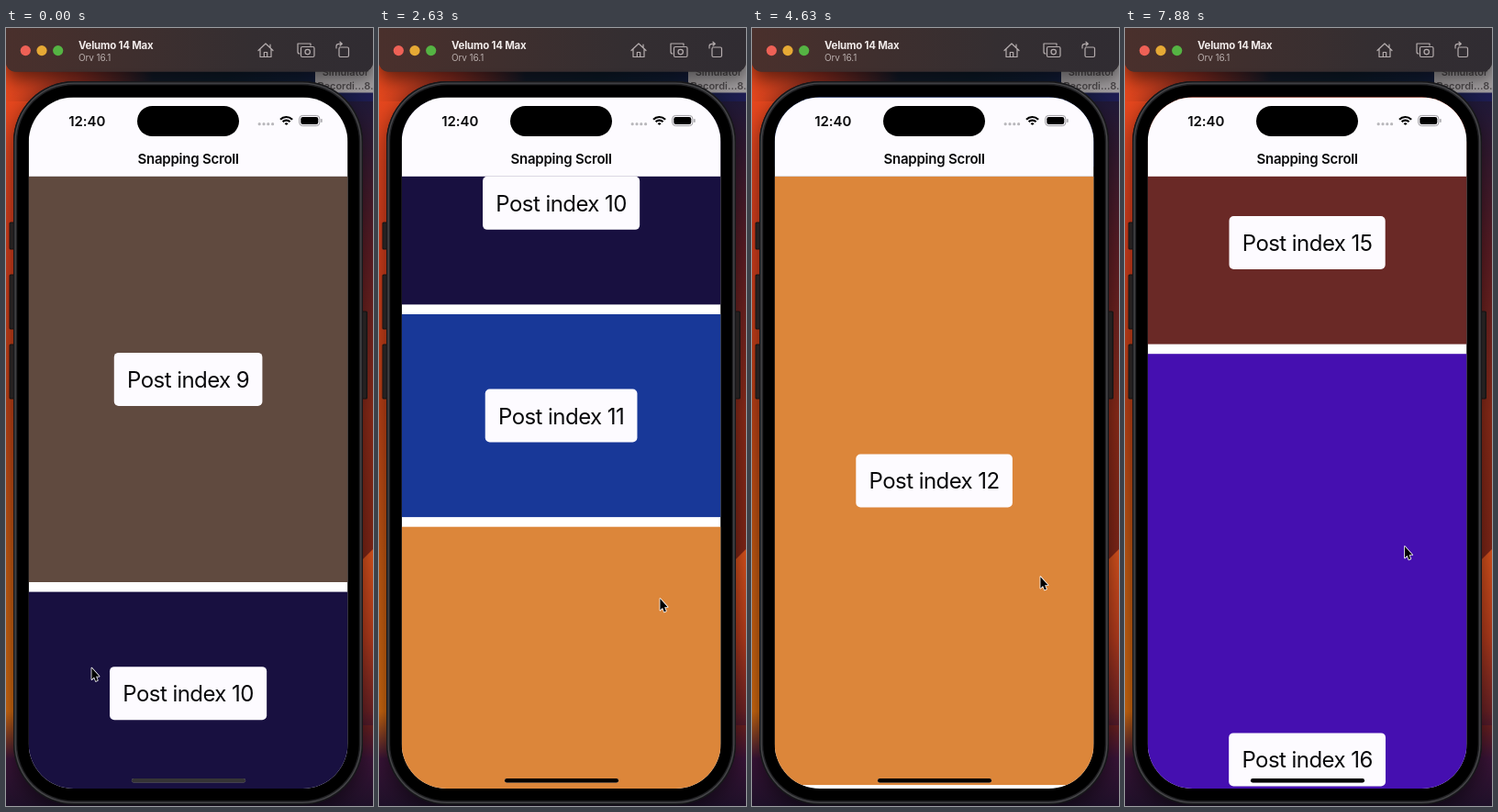
Recreate the animation shown at these times as an HTML page with a canvas. Size 400 px wide and 848 px high, loop 8000 ms.

```html
<!DOCTYPE html>
<html lang="en">
<head>
<meta charset="utf-8">
<title>Snapping Scroll</title>
<style>
html, body { margin: 0; width: 100%; height: 100%; overflow: hidden; background: #000; }
canvas { display: block; width: 400px; height: 848px; }
</style>
</head>
<body>
<canvas id="stage"></canvas>
<script>
const W = 400, H = 848, LOOP = 8000, STEP = 125;
const canvas = document.getElementById('stage');
const ctx = canvas.getContext('2d');
const dpr = window.devicePixelRatio || 1;
canvas.width = W * dpr;
canvas.height = H * dpr;

const FONT = 'Inter, Roboto, sans-serif';
const INK = '#08080a', PAPER = '#fdfbff';
const SCREEN = { x: 24.7, y: 75.5, w: 347.8, h: 753.5, r: 49 };
const LIST_TOP = 161.8, UNIT = 221.1, GAP = 10.6, MID = 198.6;

const posts = [
  { units: 2, color: '#604a3f' }, { units: 1, color: '#181040' },
  { units: 1, color: '#183898' }, { units: 3, color: '#dc863a' },
  { units: 2, color: '#7a4a50' }, { units: 3, color: '#da4023' },
  { units: 1, color: '#6a2926' }, { units: 4, color: '#450fb0' }
].map((p, n) => ({ ...p, label: 'Post index ' + (n + 9), h: p.units * UNIT }));

// each snap moves the next post to the top
const snapTimes = [300, 3500, 4000, 4900, 5800, 6850];
const SNAP = 550;

function ease(t, from, to) {
  const p = Math.min(1, Math.max(0, (t - from) / (to - from)));
  return p * p * (3 - 2 * p);
}

function scrollAt(t) {
  const snapped = snapTimes.reduce((y, s, n) => y + (posts[n].h + GAP) * ease(t, s, s + SNAP), 0);
  const firstDrag = 81.5 * ease(t, 1900, 2625) - 20.5 * ease(t, 2625, 3250) - 61 * ease(t, 3500, 4000);
  return snapped + firstDrag + 38.3 * ease(t, 7500, 7875);
}

function cursorAt(t) {
  const jump = ease(t, 250, 900);
  return [
    93 + 213 * jump + 8 * ease(t, 3250, 4625) - 9.5 * ease(t, 4625, 6500),
    697 - 38 * jump - 59 * ease(t, 1500, 3400) - 35.5 * ease(t, 4000, 7875)
  ];
}

// the home bar turns paler over some posts
function barAlpha(t) {
  return 0.71 + 0.29 * ease(t, 500, 875) - 0.15 * (ease(t, 6125, 6375) - ease(t, 6750, 7250));
}

function box(x, y, w, h, r, fill) {
  ctx.beginPath();
  ctx.roundRect(x, y, w, h, r);
  if (fill) {
    ctx.fillStyle = fill;
    ctx.fill();
  }
}

function frame(x, y, w, h, r) {
  box(x, y, w, h, r);
  ctx.stroke();
}

function disc(x, y, r, fill) {
  ctx.beginPath();
  ctx.arc(x, y, r, 0, 7);
  ctx.fillStyle = fill;
  ctx.fill();
}

function text(str, x, y, size, weight, fill, align = 'left', spacing = 0) {
  ctx.font = `${weight} ${size}px ${FONT}`;
  ctx.letterSpacing = spacing + 'px';
  ctx.textAlign = align;
  ctx.fillStyle = fill;
  ctx.fillText(str, x, y);
}

// evenly spaced colours
function blend(x0, y0, x1, y1, ...colors) {
  const g = ctx.createLinearGradient(x0, y0, x1, y1);
  colors.forEach((c, n) => g.addColorStop(n / (colors.length - 1), c));
  return g;
}

function withShadow(blur, drop, paint) {
  ctx.save();
  ctx.shadowColor = 'rgba(0,0,0,0.5)';
  ctx.shadowBlur = blur * dpr;
  ctx.shadowOffsetY = drop * dpr;
  paint();
  ctx.restore();
}

function wallpaper() {
  ctx.fillStyle = blend(0, 60, 0, 760, '#e8481e', '#d23c1c', '#bc4016', '#c65a12', '#d06a10');
  ctx.fillRect(0, 0, 200, H);
  ctx.fillStyle = blend(0, 60, 0, 600, '#18183a', '#5a1c24', '#8a2a18', '#7c2416');
  ctx.fillRect(200, 0, 200, H);
  ctx.fillStyle = blend(0, 0, W, 0, '#e2461c', '#8a2c20', '#121a28', '#0c1a28', '#101c34', '#1e1c52');
  ctx.fillRect(0, 40, W, 40);

  ctx.beginPath();
  ctx.moveTo(380, 588);
  ctx.lineTo(W, 568);
  ctx.lineTo(W, 760);
  ctx.lineTo(380, 760);
  ctx.fillStyle = blend(0, 568, 0, 760, '#d8521c', '#b03a1c', '#5c1c26');
  ctx.fill();

  ctx.fillStyle = blend(0, 745, 0, H, 'rgba(58,20,56,0)', '#3a1438', '#1e1028');
  ctx.fillRect(0, 745, W, H);
}

function desktopFile() {
  box(337, 38, 70, 32.5, 4, '#a09c9e');
  text('Simulator', 370, 52, 11, 600, '#4b4749', 'center');
  text('Recordi...8.', 370, 66.5, 11, 600, '#4b4749', 'center');
}

function toolbarIcons() {
  ctx.strokeStyle = '#b5adae';
  ctx.lineWidth = 1.2;
  ctx.lineJoin = ctx.lineCap = 'round';
  ctx.stroke(new Path2D('M275 24.5L283 17L291 24.5M277 23V31.5H289V23M288 18V21M281.3 31V26.5H284.7V31'));
  ctx.stroke(new Path2D('M320 28Q318 28 318 26V17H332V19'));
  frame(321.5, 20.5, 14.5, 11, 1.5);
  frame(326, 23.4, 5.4, 5.4, 2.7);
  frame(363, 21, 10.5, 10.5, 1.5);
  ctx.stroke(new Path2D('M360 22V20Q360 17.3 363 17.3H366M364 15.2L366.3 17.3L364 19.4'));
}

function titleBar() {
  withShadow(18, 8, () => box(0, -12, W, 59.5, 10, '#342e31'));
  box(0, -12, W, 59.5, 10, blend(0, 0, W, 0, '#4a302c', '#3f2f2e', '#342e31', '#302c32'));
  ['#ee6156', '#e6a935', '#55b443'].forEach((c, n) => disc(21.3 + n * 17.7, 24.6, 5.6, c));
  text('Velumo 14 Max', 79, 23, 11.4, 700, '#f1ebea', 'left', -0.2);
  text('Orv 16.1', 79, 35.6, 10, 400, '#b9aeac', 'left', -0.1);
  toolbarIcons();
}

function sideButton(x, y, h) {
  box(x, y, 6.5, h, 1.5, '#1b1818');
  box(x + 1, y + 1, 4, h - 2, 1, '#302a2a');
}

function phoneBody() {
  sideButton(3.5, 211.5, 30);
  sideButton(3.5, 268.5, 60);
  sideButton(3.5, 344.5, 60);
  sideButton(387.5, 308.5, 96);
  withShadow(22, 8, () => box(8, 58, 381, 788.5, 66, '#17171a'));
  ['#17171a', '#47474a', '#232326', '#000'].forEach((c, n) => {
    const d = n * 1.4;
    box(8 + d, 58 + d, 381 - 2 * d, 788.5 - 2 * d, 66 - d, c);
  });
}

function wifi(x, y) {
  ctx.strokeStyle = '#000';
  ctx.lineWidth = 2.2;
  ctx.lineCap = 'butt';
  for (const r of [1.6, 5.4, 9]) {
    ctx.beginPath();
    ctx.arc(x, y, r, -Math.PI * 0.76, -Math.PI * 0.24);
    ctx.stroke();
  }
}

function statusBar() {
  ctx.fillStyle = PAPER;
  ctx.fillRect(SCREEN.x, SCREEN.y, SCREEN.w, LIST_TOP - SCREEN.y);
  box(143, 85, 111, 33, 16.5, '#000');
  text('12:40', 88.3, 106.6, 15, 600, INK, 'center', -0.1);
  text('Snapping Scroll', MID, 147.6, 15, 600, INK, 'center', -0.22);
  for (let n = 0; n < 4; n++) disc(276.2 + n * 4.8, 104.7, 1.6, '#b9b8bc');
  wifi(305.6, 106);
  ctx.strokeStyle = '#9c9b9f';
  ctx.lineWidth = 1;
  frame(319.7, 95.4, 22.2, 11.2, 3.6);
  box(321.3, 97, 19, 8, 2.2, '#000');
  box(343.2, 99, 1.4, 4, 0.7, '#9c9b9f');
}

function list(offset) {
  ctx.fillStyle = '#fff';
  ctx.fillRect(SCREEN.x, LIST_TOP, SCREEN.w, H);
  let y = LIST_TOP - offset;
  for (const { label, h, color } of posts) {
    ctx.fillStyle = color;
    ctx.fillRect(SCREEN.x, y, SCREEN.w, h);
    const mid = y + h / 2;
    ctx.font = `400 24px ${FONT}`;
    ctx.letterSpacing = '-0.55px';
    const w = ctx.measureText(label).width + 28.5;
    box(MID - w / 2, mid - 29, w, 58, 5, PAPER);
    text(label, MID, mid + 9, 24, 400, INK, 'center', -0.55);
    y += h + GAP;
  }
}

function homeBar(t) {
  box(137, 818, 124, 4.6, 2.3, '#b8b4b8');
  ctx.globalAlpha = barAlpha(t);
  box(137, 818, 124, 4.6, 2.3, '#000');
  ctx.globalAlpha = 1;
}

function cursor([x, y]) {
  const p = new Path2D('M0 0V13.6L3.1 10.8L5.2 15.6L7.5 14.6L5.5 9.9H9.6Z');
  ctx.save();
  ctx.translate(x + 0.4, y + 0.6);
  ctx.scale(0.86, 0.92);
  ctx.lineJoin = 'round';
  ctx.strokeStyle = '#fff';
  ctx.lineWidth = 1.8;
  ctx.stroke(p);
  ctx.fillStyle = '#000';
  ctx.fill(p);
  ctx.restore();
}

function draw(t) {
  ctx.setTransform(dpr, 0, 0, dpr, 0, 0);
  wallpaper();
  desktopFile();
  titleBar();
  phoneBody();
  ctx.save();
  box(SCREEN.x, SCREEN.y, SCREEN.w, SCREEN.h, SCREEN.r);
  ctx.clip();
  list(scrollAt(t));
  statusBar();
  homeBar(t);
  ctx.restore();
  cursor(cursorAt(t));
}

const start = performance.now();
function tick() {
  const t = (performance.now() - start) % LOOP;
  draw(Math.floor(t / STEP) * STEP);
  requestAnimationFrame(tick);
}
tick();
</script>
</body>
</html>
```
